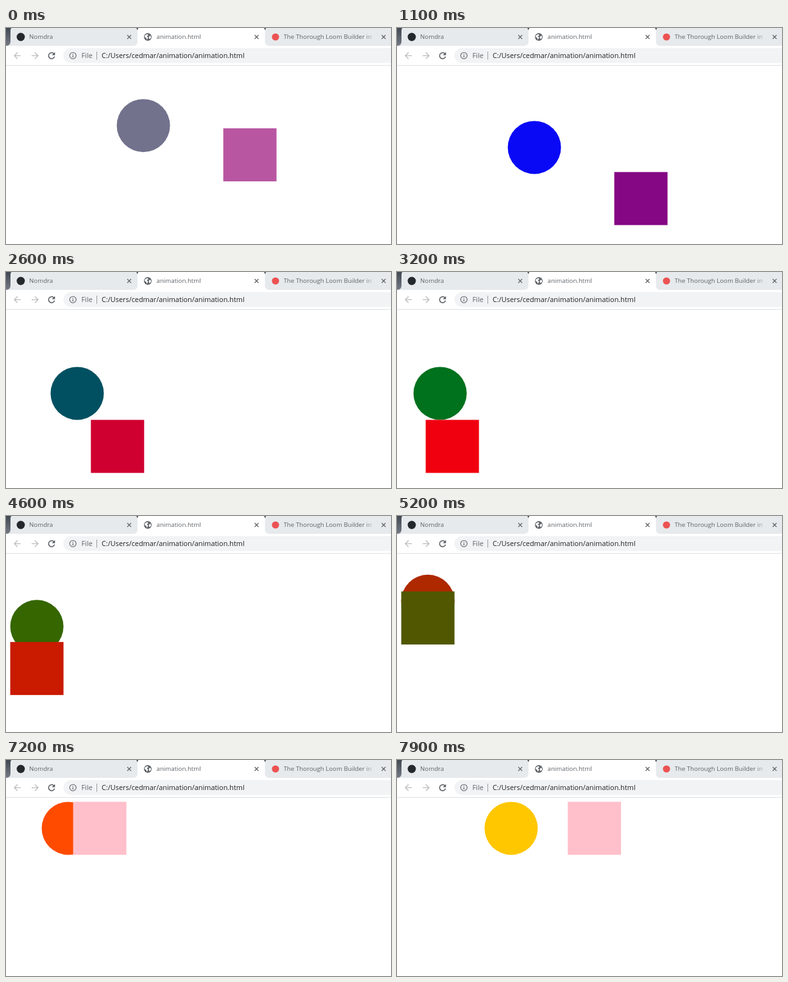
An HTML page with a canvas that plays this animation: 600 by 338 pixels, repeating every 8000 ms.

```html
<!DOCTYPE html>
<html lang="en">
<head>
<meta charset="utf-8">
<title>Two shapes</title>
<style>
  html, body { margin: 0; width: 600px; height: 338px; overflow: hidden; background: #fff; }
  body { position: relative; }
  canvas { position: absolute; left: 0; top: 0; }
  span {
    position: absolute; line-height: 20px; white-space: pre; color: #5f6368;
    font-family: "Open Sans", "Noto Sans", sans-serif;
  }
  .tab { top: 4px; font-size: 9.7px; }
  .url { top: 33px; font-size: 10.9px; }
  .fade {
    width: 145px; overflow: hidden;
    -webkit-mask-image: linear-gradient(90deg, #000 86%, transparent);
    mask-image: linear-gradient(90deg, #000 86%, transparent);
  }
</style>
</head>
<body>
<canvas id="stage" width="600" height="338"></canvas>
<span class="tab" style="left:36px">Nomdra</span>
<span class="tab" style="left:234.5px">animation.html</span>
<span class="tab fade" style="left:432.5px">The Thorough Loom Builder in</span>
<span class="url" style="left:117.5px">File</span>
<span class="url" style="left:149px;color:#202124">C:/Users/cedmar/animation/animation.html</span>
<script>
const ctx = document.getElementById('stage').getContext('2d');

const LOOP = 8000, STEP = 100, LEG = 2500, LEAD = 800;
const SIZE = 83, LEFT = 6.6, TOP = 65.4;

const RED = [255, 0, 0], YELLOW = [255, 255, 0], BLUE = [0, 0, 255];
const GREEN = [0, 128, 0], PINK = [255, 192, 203], PURPLE = [128, 0, 128];

// Travel order: down, left, up, then right again.
const CORNERS = [[1, 0], [1, 1], [0, 1], [0, 0], [1, 0]];
const circle = {
  width: 2 * SIZE, height: SIZE,
  colors: [[YELLOW, BLUE], [BLUE, GREEN], [GREEN, RED], [RED, YELLOW]]
};
const square = {
  width: 4 * SIZE, height: 2 * SIZE,
  colors: [[PINK, PURPLE], [PURPLE, RED], [RED, GREEN], [PINK, PINK]]
};

const mix = (a, b, k) => a + (b - a) * k;

// cubic-bezier(.25, .1, .25, 1)
function ease(x) {
  let lo = 0, hi = 1;
  for (let i = 0; i < 24; i++) {
    const s = (lo + hi) / 2;
    if (0.75 * s * (1 - s) + s ** 3 < x) lo = s; else hi = s;
  }
  const s = lo, r = 1 - s;
  return 0.3 * r * r * s + 3 * r * s * s + s ** 3;
}

function pose(shape, leg, k) {
  const from = CORNERS[leg], to = CORNERS[leg + 1];
  const [c0, c1] = shape.colors[leg];
  ctx.fillStyle = `rgb(${c0.map((v, i) => Math.round(mix(v, c1[i], k)))})`;
  return [
    LEFT + shape.width * mix(from[0], to[0], k),
    TOP + shape.height * mix(from[1], to[1], k)
  ];
}

function disc(x, y, r, color) {
  if (color) ctx.fillStyle = color;
  ctx.beginPath();
  ctx.arc(x, y, r, 0, 2 * Math.PI);
  ctx.fill();
}

function stroke(path, color, width) {
  ctx.strokeStyle = color;
  ctx.lineWidth = width;
  ctx.stroke(new Path2D(path));
}

function fill(path, color) {
  ctx.fillStyle = color;
  ctx.fill(new Path2D(path));
}

const strip = ctx.createLinearGradient(0, 0, 0, 28);
strip.addColorStop(0, '#414851');
strip.addColorStop(1, '#747a84');

function drawTab(x, right, color) {
  fill(`M${x - 7} 28 Q${x} 28 ${x} 21 V4 Q${x} -1 ${x + 5} -1 H${right - 5}
        Q${right} -1 ${right} 4 V21 Q${right} 28 ${right + 7} 28 Z`, color);
}

function drawBrowser() {
  fill('M0 0H600V28H0Z', strip);
  fill('M204 3H600V28H204Z', '#e7eaed');
  drawTab(7, 204.5, '#e7eaed');
  drawTab(404, 606, '#e7eaed');
  drawTab(205, 403.5, '#fff');

  disc(23, 14, 6.4, '#24292e');
  disc(420, 14, 5.6, '#ec5252');

  disc(221, 14, 6, '#5f6368');
  fill('M216.5 11.5L220 9.5L222 11L219.5 13L221.5 15L219.5 18.5L218.5 15.5L216 14Z', '#fff');
  fill('M223 13L225.5 12L226 15.5L223.5 17.5L222.5 15Z', '#fff');

  for (const x of [192, 390.5, 588.5])
    stroke(`M${x - 3} 11l6 6m0 -6l-6 6`, '#5f6368', 1.2);

  for (const [x, d] of [[18, 1], [45, -1]])
    stroke(`M${x + 5 * d} 43.3H${x - 5 * d}M${x} 38.3L${x - 5 * d} 43.3L${x} 48.3`, '#babcbe', 1.3);

  stroke('M74.4 40A4.7 4.7 0 1 0 75.6 44.6', '#55595e', 1.5);
  fill('M76.3 37.8V42.6H71.5Z', '#55595e');

  fill('M101 31.5H600V54.7H101A11.6 11.6 0 0 1 101 31.5Z', '#f1f3f4');
  stroke('M99.3 43.2a5 5 0 1 0 10 0a5 5 0 1 0 -10 0', '#5f6368', 1.1);
  stroke('M104.3 42.4V46M104.3 40.2V41.4', '#5f6368', 1.2);
  stroke('M141.5 37V49.5', '#9a9da1', 1);
  stroke('M0 58.5H600', '#dfe1e4', 1);
}

function draw(now) {
  const t = Math.floor(((now + 8) % LOOP) / STEP) * STEP + LEAD;
  const leg = Math.floor(t / LEG);
  const k = ease(t % LEG / LEG);

  ctx.fillStyle = '#fff';
  ctx.fillRect(0, 0, 600, 338);
  drawBrowser();

  const [cx, cy] = pose(circle, leg, k);
  disc(cx + SIZE / 2, cy + SIZE / 2, SIZE / 2);
  const [sx, sy] = pose(square, leg, k);
  ctx.fillRect(sx, sy, SIZE, SIZE);

  requestAnimationFrame(draw);
}
requestAnimationFrame(draw);
</script>
</body>
</html>
```
